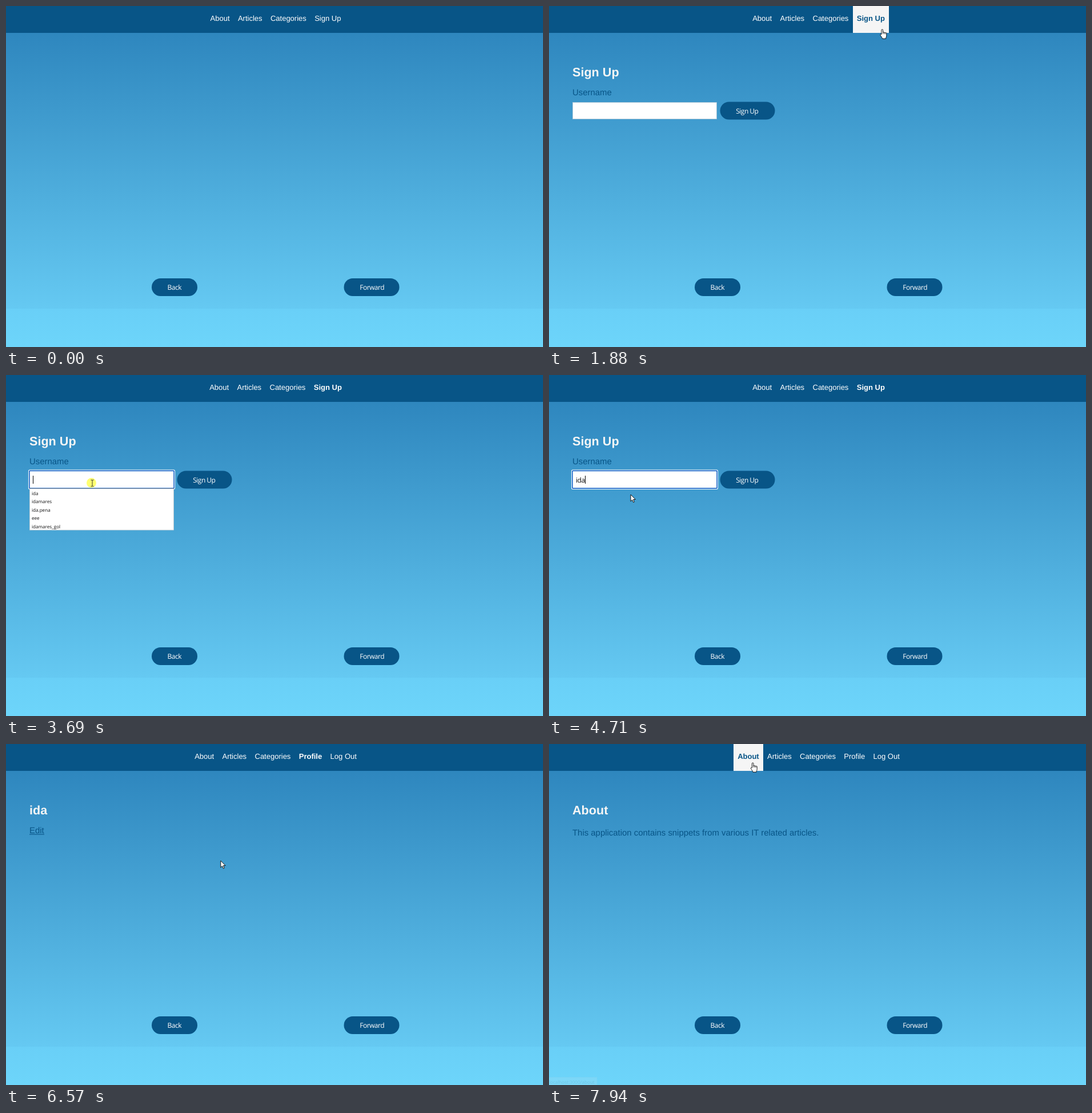
An HTML page that plays this animation: 940 px wide and 596 px high, repeating every 8 s.

```html
<!DOCTYPE html>
<html lang="en">
<head>
<meta charset="utf-8">
<title>Sign up demo</title>
<style>
  html, body { margin: 0; width: 100%; height: 100%; overflow: hidden; }
  body {
    position: relative;
    background: linear-gradient(#2980b9 0, #65c9f2 529px, #69cff7 529px, #6dd5fa 596px);
    font-family: "Liberation Sans", Arial, sans-serif;
    text-rendering: geometricPrecision;
  }
  nav {
    position: absolute; left: 0; top: 0; width: 940px; height: 47px;
    padding-left: 4px; box-sizing: border-box;
    display: flex; justify-content: center;
    background: #085587;
  }
  nav span {
    padding: 0 7.2px; height: 47px; line-height: 44px;
    font-size: 13px; color: #fff; white-space: nowrap;
  }
  nav .active { font-weight: bold; }
  nav .hover { background: #f5f5f5; color: #085587; }
  svg { position: absolute; left: 0; top: 0; }
  .title { font-size: 21.6px; font-weight: bold; fill: #f5f5f5; }
  .body { font-size: 14.92px; fill: #085587; }
  .ui { font: 12px "Open Sans", "Noto Sans", sans-serif; letter-spacing: -.5px; fill: #fff; }
  .small { font: 8.1px "Open Sans", "Noto Sans", sans-serif; fill: #111; }
  .pill { fill: #085587; }
  .cursor { fill: #fff; stroke: #000; stroke-width: .9; stroke-linejoin: round; }
</style>
</head>
<body>
<nav id="nav"></nav>
<svg width="940" height="596" viewBox="0 0 940 596">
  <rect class="pill" x="255" y="476" width="80" height="31" rx="15.5"/>
  <text class="ui" x="282.6" y="496">Back</text>
  <rect class="pill" x="591.5" y="476" width="97" height="31" rx="15.5"/>
  <text class="ui" x="619.2" y="496">Forward</text>

  <g id="signup">
    <text class="title" x="41" y="123">Sign Up</text>
    <text class="body" x="41" y="156">Username</text>
    <rect x="41.5" y="168.5" width="252" height="29" fill="#fff" stroke="#a9c3d4" stroke-width=".8"/>
    <g id="ring">
      <rect x="39" y="165.6" width="257" height="34.4" rx="2.5" fill="#fff"/>
      <rect x="40" y="166.6" width="255" height="32.4" rx="2" fill="#1a66c8"/>
      <rect x="41.7" y="168.3" width="251.6" height="29" rx=".5" fill="#fff"/>
    </g>
    <rect class="pill" x="299.5" y="167.5" width="96" height="31" rx="15.5"/>
    <text class="ui" x="327.2" y="188">Sign Up</text>
    <text class="ui" id="typed" x="47" y="188" style="fill:#111">ida</text>
    <rect id="caret" y="176" width="1" height="14" fill="#000"/>
    <g id="list">
      <rect x="41.5" y="198.5" width="252" height="72.5" fill="#fff" stroke="#c4ccd2" stroke-width=".8"/>
      <rect x="41" y="198" width="253" height="1" fill="#7d8794"/>
      <rect id="row" x="42" y="199.5" width="251" height="14.5" fill="#e9e9ec"/>
    </g>
  </g>

  <g id="profile">
    <text class="title" x="41" y="123">ida</text>
    <text class="body" x="41" y="156">Edit</text>
    <rect x="41" y="157.4" width="26" height="1.1" fill="#085587"/>
  </g>

  <g id="about">
    <text class="title" x="41" y="123">About</text>
    <text class="body" x="41" y="160">This application contains snippets from various IT related articles.</text>
  </g>

  <g id="status">
    <rect id="statusBox" x="-1" y="582.5" height="15" fill="#e8ebee" stroke="#c9d2d8" stroke-width=".6"/>
    <text class="small" id="statusText" x="0" y="593.5" style="fill:#5f6368"></text>
  </g>

  <g id="pointer">
    <circle id="glow" cx="-1.5" cy="-.5" r="8.5" fill="#ffff5c" fill-opacity=".88"/>
    <path id="arrow" class="cursor" d="M0 0V11.8L2.7 9.2 4.6 13.6 6.5 12.8 4.6 8.5H8.3Z"/>
    <g id="hand">
      <path class="cursor" d="M-1.4 8.6V1.2a1.3 1.3 0 0 1 2.6 0V5.6a1.1 1.1 0 0 1 2.2.3a1.1 1.1 0 0 1 2.1.4a1 1 0 0 1 1.9.7V10.5c0 2.6-1.2 3.6-1.2 5.6H.2C-.4 14-1.8 12.4-3.4 9.9c-.6-1.2.8-2.2 2-1.3z"/>
      <path d="M1.2 5.6V8M3.4 6V8.2M5.5 6.5V8.4" stroke="#000" stroke-width=".7"/>
    </g>
    <path id="beam" d="M-2.5-5.5H-.7L0-5 .7-5.5H2.5M0-5V5M-2.5 5.5H-.7L0 5 .7 5.5H2.5" fill="none" stroke="#222" stroke-width=".9"/>
  </g>
</svg>
<script>
const LOOP = 8000, START = 320, STEP = 67.4;
const $ = id => document.getElementById(id);
const show = (id, on) => { $(id).style.display = on ? '' : 'none'; };
const within = (t, spans) => spans.some(([a, b]) => t >= a && t < b);

// time, x, y, cursor kind from here on
const path = [
  [320, 905, 552, 'arrow'], [590, 818, 375, 'arrow'], [860, 690, 168, 'arrow'],
  [1061, 605, 61, 'arrow'], [1129, 593.4, 44.4, 'arrow'], [1196, 586, 41, 'hand'],
  [1264, 583.4, 41, 'hand'], [1872, 583.4, 41, 'hand'], [1938, 578, 85, 'arrow'],
  [2073, 568, 281, 'arrow'], [2275, 566, 304, 'arrow'], [2477, 455, 297, 'arrow'],
  [2680, 290, 248, 'arrow'], [2880, 175, 199, 'beam'], [2949, 154.5, 194, 'beam'],
  [3480, 154.5, 194, 'beam'], [3620, 151, 189, 'beam'], [4026, 151, 189, 'beam'],
  [4160, 147, 203, 'arrow'], [4296, 143, 209, 'arrow'], [5105, 143, 209, 'arrow'],
  [5240, 215, 245, 'arrow'], [5310, 275, 253, 'arrow'], [5375, 335, 243, 'arrow'],
  [5442, 362.8, 223.4, 'arrow'], [5577, 367, 198, 'hand'], [5645, 365, 191, 'hand'],
  [6030, 365, 191, 'arrow'], [6319, 365, 191, 'arrow'], [6453, 371, 196, 'arrow'],
  [6588, 375.8, 204, 'arrow'], [6723, 375, 231, 'arrow'], [6858, 375, 231, 'arrow'],
  [7060, 391, 195, 'arrow'], [7195, 383, 105, 'arrow'], [7330, 362, 42, 'hand'],
  [7397, 356.8, 33, 'hand'], [LOOP, 356.8, 33, 'hand']
];

const clicks = [[1470, 1600], [3020, 3160], [3620, 3760], [4570, 4710], [5770, 5900], [7540, 7680]];
const caretOn = [[3020, 3490], [3560, 4060], [4640, 5170], [5650, 5850]];
const guest = ['About', 'Articles', 'Categories', 'Sign Up'];
const member = ['About', 'Articles', 'Categories', 'Profile', 'Log Out'];
const pages = [
  { at: 0, links: guest, active: '' },
  { at: 1600, links: guest, active: 'Sign Up', id: 'signup' },
  { at: 6030, links: member, active: 'Profile', id: 'profile' },
  { at: 7660, links: member, active: 'About', id: 'about' }
];
const hovers = [[1196, 1938, 'Sign Up'], [7320, LOOP, 'About']];
const bars = [
  { text: 'localhost:3000/signup', width: 92, from: 1340, to: 1520, fade: 160 },
  { text: 'localhost:3000/about', width: 84, from: 7540, to: 7690, fade: 290 }
];

['ida', 'idamares', 'ida.pena', 'eee', 'idamares_gol'].forEach((name, i) => {
  const text = document.createElementNS('http://www.w3.org/2000/svg', 'text');
  text.setAttribute('class', 'small');
  text.setAttribute('x', 45);
  text.setAttribute('y', 210 + i * 14.4);
  text.textContent = name;
  $('list').append(text);
});

let navKey = null;
function drawNav(page, hover) {
  const key = page.at + hover;
  if (key === navKey) return;
  navKey = key;
  $('nav').replaceChildren(...page.links.map(name => {
    const link = document.createElement('span');
    link.textContent = name;
    link.classList.toggle('active', name === page.active);
    link.classList.toggle('hover', name === hover);
    return link;
  }));
}

function drawPointer(t) {
  show('pointer', t >= START);
  if (t < START) return;
  const tick = Math.max(START, START + Math.floor((t - START + 20) / STEP) * STEP);
  const i = Math.max(1, path.findIndex(p => p[0] > tick));
  const [t0, x0, y0, kind] = path[i - 1], [t1, x1, y1] = path[i];
  const k = (tick - t0) / (t1 - t0);
  $('pointer').setAttribute('transform', `translate(${x0 + (x1 - x0) * k} ${y0 + (y1 - y0) * k})`);
  for (const name of ['arrow', 'hand', 'beam']) show(name, name === kind);
  show('glow', within(t, clicks));
}

function drawStatus(t) {
  const bar = bars.find(b => t >= b.from && t < b.to + b.fade);
  show('status', bar);
  if (!bar) return;
  $('statusText').textContent = bar.text;
  $('statusBox').setAttribute('width', bar.width + 1);
  const alpha = Math.min(1, (t - bar.from) / 100, (bar.to + bar.fade - t) / bar.fade);
  $('status').setAttribute('opacity', alpha);
}

function draw(t) {
  const page = pages.filter(p => t >= p.at).pop();
  const hover = hovers.find(h => t >= h[0] && t < h[1]);
  drawNav(page, hover ? hover[2] : '');
  for (const id of ['signup', 'profile', 'about']) show(id, page.id === id);
  const typed = t >= 4150;
  show('ring', t >= 3020 && t < 5850);
  show('list', t >= 3680 && t < 4640);
  show('row', t >= 4150);
  show('typed', typed);
  show('caret', within(t, caretOn));
  $('caret').setAttribute('x', typed ? 63 : 47);
  drawPointer(t);
  drawStatus(t);
}

const begin = performance.now();
function frame() {
  draw((performance.now() - begin) % LOOP);
  requestAnimationFrame(frame);
}
frame();
</script>
</body>
</html>
```
